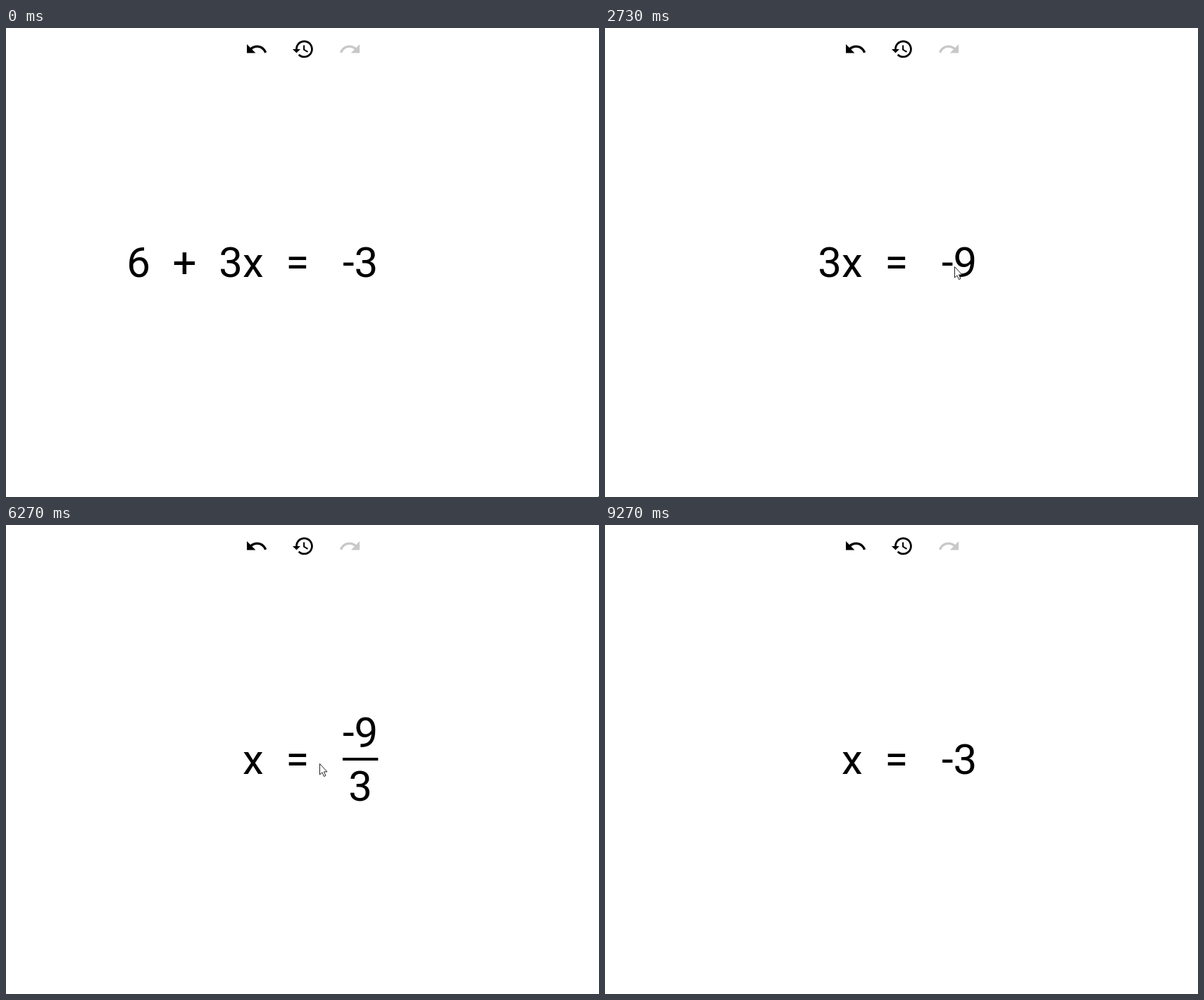
An HTML page with a canvas for the animation above (9870 ms loop, 842 by 665 pixels).

```html
<!DOCTYPE html>
<html lang="en">
<head>
<meta charset="utf-8">
<title>Solving an equation</title>
<style>
  html, body { margin: 0; width: 100%; height: 100%; overflow: hidden; background: #fff; }
  canvas { display: block; }
</style>
</head>
<body>
<canvas id="stage" width="842" height="665"></canvas>
<script>
const RATE = 15, TICKS = 148;   // the clock advances in ticks, 15 per second
const DRAG = 26, DROP = 40, DIVIDE = 71, REDUCE_LEFT = 87, REDUCE_RIGHT = 100;
const BASE = 353, EQUALS = 397.3, RIGHT = 478, GAP = 31.6;

const ctx = document.getElementById('stage').getContext('2d');
ctx.font = '60px Roboto, sans-serif';

const undoIcon = new Path2D('M12.5 8c-2.65 0-5.05.99-6.9 2.6L2 7v9h9l-3.62-3.62c1.39-1.16 3.16-1.88 5.12-1.88 3.54 0 6.55 2.31 7.6 5.5l2.37-.78C21.08 11.03 17.15 8 12.5 8z');
const historyIcon = new Path2D('M13 3c-4.97 0-9 4.03-9 9H1l3.89 3.89.07.14L9 12H6c0-3.87 3.13-7 7-7s7 3.13 7 7-3.13 7-7 7c-1.93 0-3.68-.79-4.94-2.06l-1.42 1.42C8.27 19.99 10.51 21 13 21c4.97 0 9-4.03 9-9s-4.03-9-9-9zm-1 5v5l4.28 2.54.72-1.21-3.5-2.08V8H12z');
const arrow = new Path2D('M.5 .5V16L4 12.8 6.5 18.5 8.9 17.5 6.5 11.9H11Z');

const within = (tick, from, to) => tick >= from && tick < to;
const widthOf = text => ctx.measureText(text).width;
const write = (text, x, y = BASE) => ctx.fillText(text, x, y);

// cursor strokes: start, end, destination x, y, downward sag; each begins where the last ended
const strokes = [
  [2, 5, 456, 556], [10, 20, 195, 342],
  [24, 34, 496, 346, 85], [34, 39, 496, 338], [44, 55, -40, 465],
  [73, 73, -15, 167], [73, 82.5, 347, 329], [90, 97, 511, 344],
  [110, 113, 370, 340], [113, 123, 217, 423], [124, 124, -20, 411],
  [133, 133, 180, 412], [136, 139, 20, 725]
];

const ease = u => u ** 1.34 / (u ** 1.34 + (1 - u) ** 1.34);

function cursorAt(tick) {
  let x = 841, y = 664;
  for (const [start, end, toX, toY, sag = 0] of strokes) {
    if (tick < start) break;
    const p = tick >= end ? 1 : ease((tick - start) / (end - start));
    x += (toX - x) * p;
    y += (toY - y) * p + sag * Math.sin(Math.PI * p);
  }
  return [Math.round(x), Math.round(y)];
}

function icon(path, slot, color, flip) {
  ctx.save();
  ctx.translate(355.8 + 66.3 * slot, 13.4);
  ctx.scale(flip ? -1.375 : 1.375, 1.375);
  ctx.translate(-12, 0);
  ctx.fillStyle = color;
  ctx.fill(path);
  ctx.restore();
}

function term(text, x, divided) {
  if (!divided) return write(text, x);
  const width = widthOf(text);
  write(text, x, BASE - 38);
  ctx.fillRect(x, 330, width, 4);
  write('3', x + (width - widthOf('3')) / 2, BASE + 38);
}

function dashedLine(x, y, dx, dy) {
  const length = dx + dy, gaps = Math.round((length - 8) / 12);
  ctx.setLineDash([8, (length - 8) / gaps - 8]);
  ctx.beginPath();
  ctx.moveTo(x, y);
  ctx.lineTo(x + dx, y + dy);
  ctx.stroke();
}

function slot(x, width) {
  const top = 306, height = 55;
  ctx.lineWidth = 4;
  ctx.strokeStyle = '#000';
  for (const y of [top + 2, top + height - 2]) dashedLine(x, y, width, 0);
  for (const side of [x + 2, x + width - 2]) dashedLine(side, top, 0, height);
  ctx.setLineDash([]);
}

function drawEquation(tick, dragging) {
  const left = tick < REDUCE_LEFT ? '3x' : 'x';
  const right = within(tick, DROP, REDUCE_RIGHT) ? '-9' : '-3';

  // the left side is laid out backwards from the equals sign
  let x = EQUALS - GAP - widthOf(left);
  write('=', EQUALS);
  term(left, x, within(tick, DIVIDE, REDUCE_LEFT));
  if (tick < DROP) {
    write('+', x -= GAP + widthOf('+'));
    x -= GAP + widthOf('6');
    if (dragging) slot(x - 8.4, 51);
    else write('6', x);
  }

  if (dragging) {
    write(right, RIGHT - 6, BASE + 2);
    slot(RIGHT - 8, 54);
    write('-', RIGHT + 68);
    slot(RIGHT + 108, 55);
  } else {
    term(right, RIGHT, within(tick, DIVIDE, REDUCE_RIGHT));
  }
}

function drawCursor(x, y, badge) {
  ctx.save();
  ctx.translate(x, y);
  ctx.lineWidth = 1;
  ctx.strokeStyle = '#222';
  ctx.fillStyle = '#fff';
  ctx.fill(arrow);
  ctx.stroke(arrow);
  if (badge) {
    ctx.fillRect(3, 14, 11, 10);
    ctx.setLineDash([2, 1]);
    ctx.strokeRect(3.5, 14.5, 10, 9);
  }
  ctx.restore();
}

function draw(tick) {
  const [x, y] = cursorAt(tick);
  const dragging = within(tick, DRAG, DROP);
  ctx.fillStyle = '#fff';
  ctx.fillRect(0, 0, 842, 665);
  icon(undoIcon, 0, '#000');
  icon(historyIcon, 1, '#000');
  icon(undoIcon, 2, '#c8c8c8', true);
  ctx.fillStyle = '#000';
  drawEquation(tick, dragging);
  if (dragging) {
    ctx.globalAlpha = 0.75;
    write('6', x - 23.5, y + 12);
    ctx.globalAlpha = 1;
  }
  drawCursor(x, y, within(tick, DRAG, DROP + 1));
}

const start = performance.now();
function loop() {
  const elapsed = (performance.now() - start) / 1000;
  draw(Math.floor(elapsed * RATE + 0.05) % TICKS);
  requestAnimationFrame(loop);
}
loop();
</script>
</body>
</html>
```
